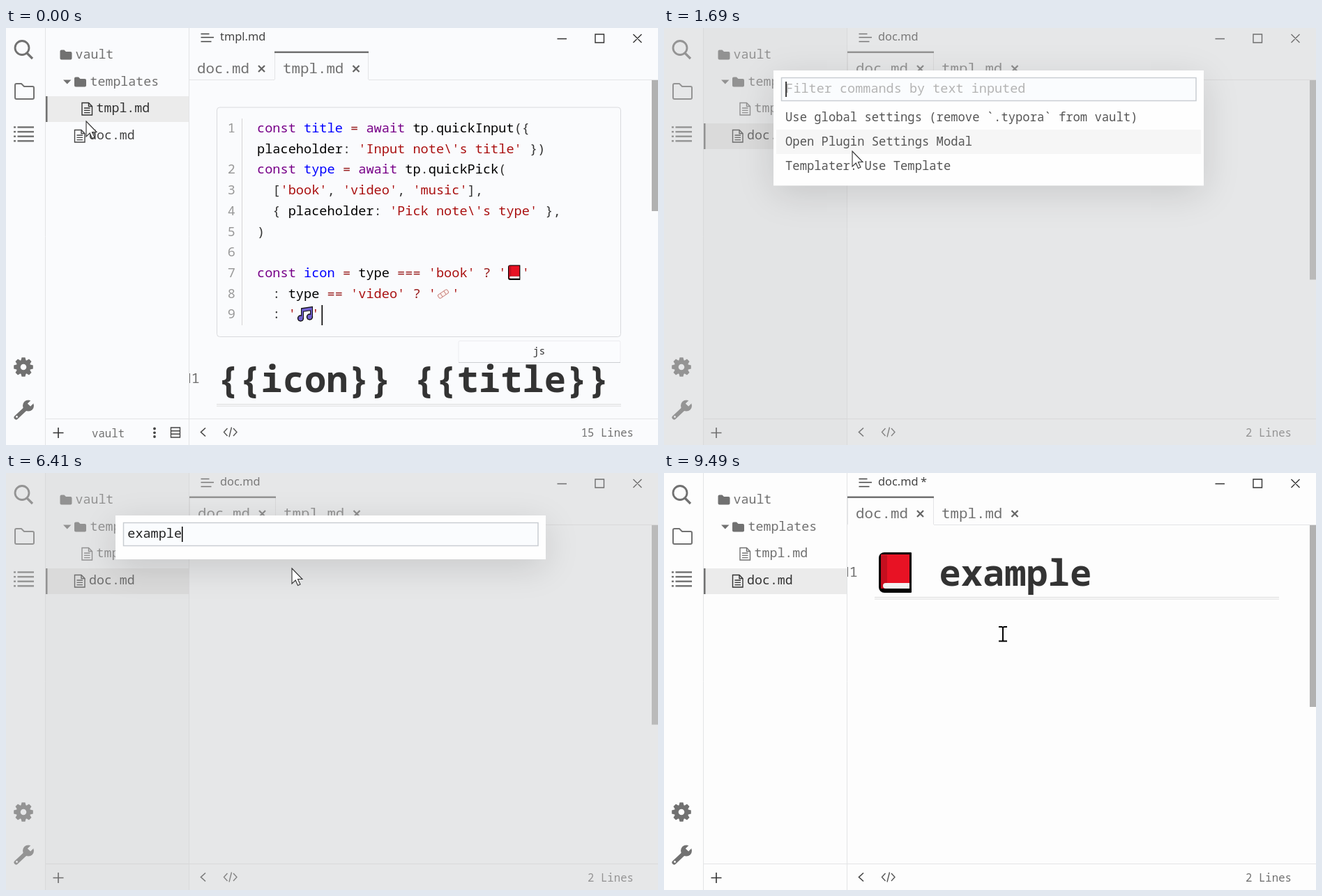
Animation of 935x599 px, one loop 9690 ms. Source, as an HTML page with a canvas:

```html
<!DOCTYPE html>
<html lang="en">
<head>
<meta charset="utf-8">
<title>Note templates</title>
<style>
  html, body { margin: 0; width: 100%; height: 100%; overflow: hidden; background: #fafbfd; }
  canvas { display: block; width: 100vw; height: 100vh; }
</style>
</head>
<body>
<canvas id="stage" width="935" height="599"></canvas>
<script>
const ctx = document.getElementById('stage').getContext('2d');
const LOOP = 9690, BLINK = 530;
const OPEN_DOC = 600, OPEN_MODAL = 1690, CLOSE_MODAL = 8030, MARK_EDITED = 8090, INSERT = 8350;
const MONO = '"Noto Sans Mono", "DejaVu Sans Mono", monospace';
const SANS = '"Noto Sans", "Open Sans", sans-serif';
const GREY = '#717171', DARK = '#333', RULE = '#e3e4e6';

const pointerPath = [
  [70, 115, 134], [530, 150, 150], [1000, 150, 150], [1400, 172, 188], [1620, 243, 184],
  [1690, 270, 177], [2000, 278, 177], [2200, 292, 192], [2430, 300, 192], [2760, 411, 140],
  [3680, 411, 140], [4020, 410, 137], [7240, 410, 137], [7290, 410, 122], [7430, 410, 122],
  [7760, 411, 122], [8350, 411, 122], [8960, 486, 231]
];

const prompts = [
  { at: 1690, hint: 'Filter commands by text inputed', rows: [
    'Use global settings (remove `.typora` from vault)',
    'Open Plugin Settings Modal', 'Templater: Use Template'] },
  { at: 2430, hint: 'Select a template', rows: ['tmpl.md'] },
  { at: 3890, hint: "Input note's title", rows: [] },
  { at: 6890, hint: "Pick note's type", rows: ['book', 'video', 'music'] }
];
const typed = 'example', keyTimes = [4620, 4950, 5580, 5680, 6020, 6210, 6410];

// Each entry: line number, code. Double spaces in quotes leave room for icons.
const code = [
  [1, 'const title = await tp.quickInput({'],
  ['', "placeholder: 'Input note\\'s title' })"],
  [2, 'const type = await tp.quickPick('],
  [3, "  ['book', 'video', 'music'],"],
  [4, "  { placeholder: 'Pick note\\'s type' },"],
  [5, ')'],
  [6, ''],
  [7, "const icon = type === 'book' ? '  '"],
  [8, "  : type == 'video' ? '  '"],
  [9, "  : '  '"]
];
const tokenRule = /('(?:\\.|[^'\\])*')|\b(const|await)\b|((?<=const )\w+)|([=?]+)|(\w+)|([^\w\s])/g;
const tokenColors = ['#a11', '#708', '#00f', '#981a1a', '#000', '#333'];

function text(str, x, y, size, color, { font = MONO, weight = 400, align = 'left' } = {}) {
  ctx.font = `${weight} ${size}px ${font}`;
  ctx.textAlign = align;
  ctx.fillStyle = color;
  ctx.fillText(str, x, y);
}

function rect(x, y, w, h, color) {
  ctx.fillStyle = color;
  ctx.fillRect(x, y, w, h);
}

function box(x, y, w, h, radius, fill, stroke, width = 1) {
  ctx.beginPath();
  ctx.roundRect(x, y, w, h, radius);
  if (fill) { ctx.fillStyle = fill; ctx.fill(); }
  if (stroke) { ctx.strokeStyle = stroke; ctx.lineWidth = width; ctx.stroke(); }
}

// Paths are SVG path strings.
function stroke(path, width = 1.5, color = GREY) {
  ctx.strokeStyle = color;
  ctx.lineWidth = width;
  ctx.stroke(new Path2D(path));
}

function fill(path, color = GREY) {
  ctx.fillStyle = color;
  ctx.fill(new Path2D(path));
}

function dot(x, y, r, color) {
  ctx.fillStyle = color;
  ctx.beginPath();
  ctx.arc(x, y, r, 0, 7);
  ctx.fill();
}

function at(x, y, scale, draw) {
  ctx.save();
  ctx.translate(x, y);
  ctx.scale(scale, scale);
  draw();
  ctx.restore();
}

const blinkOn = (t, since) => Math.floor((t - since) / BLINK) % 2 === 0;

function pointerAt(t) {
  const i = pointerPath.findIndex(p => p[0] > t);
  if (i === 0) return pointerPath[0].slice(1);
  if (i < 0) return pointerPath.at(-1).slice(1);
  const [t0, x0, y0] = pointerPath[i - 1], [t1, x1, y1] = pointerPath[i];
  const k = (t - t0) / (t1 - t0);
  return [x0 + (x1 - x0) * k, y0 + (y1 - y0) * k];
}

function book(x, y, scale) {
  at(x, y, scale, () => {
    box(0, 0, 47, 58, [8, 1, 1, 8], '#000');
    rect(3, 3, 41, 41, '#e81224');
    rect(3, 4, 9, 48, '#c50f1f');
    box(6, 44, 38, 8, [4, 0, 0, 4], '#f2f2f2');
  });
}

function musicNote(x, y) {
  at(x, y, 1, () => {
    stroke('M7 16V4L20 2V14M7 6L20 4', 4, '#111');
    dot(4.5, 17, 4.7, '#111');
    dot(17.5, 15, 4.7, '#111');
    stroke('M7 16V4.3L20 2.3V14M7 6L20 4', 1.8, '#7160d0');
    dot(4.5, 17, 3.2, '#7160d0');
    dot(17.5, 15, 3.2, '#7160d0');
  });
}

function clip(x, y) {
  at(x, y, 1, () => {
    ctx.rotate(-0.6);
    box(-8, -3, 16, 6, 2, '#fdf3f0', '#c98580', 1);
    stroke('M-3 -3V3M3 -3V3', 1, '#c98580');
  });
}

function folder(x, y) {
  fill(`M${x} ${y + 2}q0 -2 2 -2h4l2.5 2.5h6.5q2 0 2 2v7.500q0 2 -2 2h-13q-2 0 -2 -2z`);
}

function fileIcon(x, y, color) {
  stroke(`M${x} ${y}h9.500l5 5v12.500h-14.500zM${x + 9.5} ${y}v5h5`, 1.4, color);
  stroke(`M${x + 3} ${y + 7.5}h8.500m-8.500 3.300h8.500m-8.500 3.300h8.500`, 1.3, color);
}

function gear(x, y) {
  at(x, y, 1, () => {
    for (let i = 0; i < 8; i++) {
      ctx.rotate(Math.PI / 4);
      fill('M-3.700 -9L-2.500 -13.800H2.500L3.700 -9z');
    }
    ctx.beginPath();
    ctx.arc(0, 0, 7.3, 0, 7);
    ctx.strokeStyle = GREY;
    ctx.lineWidth = 6;
    ctx.stroke();
  });
}

function ribbon(bg) {
  ctx.beginPath();
  ctx.arc(23, 28.5, 10, 0, 7);
  ctx.strokeStyle = GREY;
  ctx.lineWidth = 2.8;
  ctx.stroke();
  stroke('M30 36L38 44', 3.2);
  stroke('M13 82q0 -2 2 -2h7l4 4h12q2 0 2 2v14q0 2 -2 2h-23q-2 0 -2 -2z', 2);
  for (let y = 142.5; y < 164; y += 6.6) {
    rect(11, y - 1.2, 3, 2.4, GREY);
    rect(16.5, y - 1.2, 23.5, 2.4, GREY);
  }
  gear(25, 487);
  ctx.lineCap = 'round';
  stroke('M14.500 559.500L31 544', 6);
  ctx.lineCap = 'butt';
  dot(32, 542.5, 8, GREY);
  stroke('M33 541.500L42 532.500', 6, bg);
  dot(15.5, 558.5, 1.4, bg);
}

function sidebar(docOpen, hovered) {
  const rowY = docOpen ? 137 : 98;
  rect(57, rowY, 205, 37, '#ebebeb');
  rect(57, rowY, 2.5, 37, GREY);
  folder(77.5, 31.5);
  text('vault', 99.5, 44, 18.3, GREY);
  fill('M82 74.500h11.500l-5.750 6z');
  folder(98, 70.5);
  text('templates', 120.5, 82.5, 18.3, GREY);
  const tmplColor = docOpen ? GREY : DARK, docColor = docOpen ? DARK : GREY;
  fileIcon(109, 107.5, tmplColor);
  text('tmpl.md', 129.5, 121, 18.3, tmplColor);
  fileIcon(98.5, 146.5, docOpen ? DARK : '#444');
  text('doc.md', 119, 160, 18.3, docOpen ? docColor : '#444');
  stroke('M67.500 581.500h15M75 574v15', 1.6, DARK);
  if (hovered) {
    text('vault', 123, 587.5, 15.7, GREY);
    for (const y of [575.5, 581.3, 587]) dot(213, y, 1.9, '#444');
    stroke('M236.500 574h13v14h-13zM236.500 578.700h13M236.500 583.300h13', 1.4, '#444');
  }
}

function tab(name, x, active, left, right) {
  if (active) {
    stroke(`M${left + .5} 74V35M${right - .5} 35V74`, 1, RULE);
    rect(left, 33.5, right - left, 2.5, GREY);
  }
  text(name, x, 65, 20.8, GREY);
  const cx = x + name.length * 12.5 + 17.5;
  stroke(`M${cx - 4.5} 54l9 9m0 -9l-9 9`, 2.3, '#666');
}

function windowFrame(docOpen, edited, lineCount) {
  stroke('M56.500 0V599M262.500 0V599M57 561.500H935', 1, RULE);
  stroke('M279.500 8.500h12M279.500 13.500h18.500M279.500 19.500h15', 1.3, '#444');
  text(docOpen ? 'doc.md' : 'tmpl.md', 307, 18, 16.4, '#444', { font: SANS });
  if (edited) text('*', 368, 18, 16.4, '#444', { font: SANS });
  stroke('M790.500 15.500h13.500M845 9h12.500v12h-12.500zM899.500 9l12 12m0 -12l-12 12', 1.4, DARK);
  const shift = docOpen ? 1 : 0;
  stroke(docOpen ? 'M387 74.500H935' : 'M263 74.500H385M520 74.500H935', 1, RULE);
  tab('doc.md', 274 + shift, docOpen, 263, 387);
  tab('tmpl.md', 397 + shift, !docOpen, 385, 520);
  stroke('M286 574.500l-6.500 6l6.500 6', 1.6, '#444');
  stroke('M317.500 575l-5 5.500l5 5.500M326 575l5 5.500l-5 5.500M323.500 573.500l-3.500 14', 1.4, '#555');
  text(`${lineCount} Lines`, 900, 586.5, 15.7, GREY, { align: 'right' });
}

function headingTag(baseline) {
  ctx.save();
  ctx.beginPath();
  ctx.rect(263, 0, 40, 599);
  ctx.clip();
  text('H1', 278, baseline, 20.8, GREY, { align: 'right' });
  ctx.restore();
}

function templatePage(t) {
  const size = 18.62, step = size * 0.6;
  box(302.5, 114, 579, 329.5, 4, null, '#d9dadd');
  stroke('M338.500 130V427', 1, '#d5d5d5');
  code.forEach(([number, line], i) => {
    const y = 150 + i * 29.7;
    text(number, 329, y, size, '#999', { align: 'right' });
    for (const match of line.matchAll(tokenRule)) {
      const kind = match.slice(1).findIndex(Boolean);
      text(match[0], 360 + match.index * step, y, size, tokenColors[kind]);
    }
  });
  book(720, 340.5, 0.37);
  clip(627, 382);
  musicNote(418, 400);
  if (blinkOn(t, 0)) rect(452.5, 398, 1.6, 29, '#000');
  headingTag(510);
  text('{{icon}} {{title}}', 303, 523, 52.1, DARK, { weight: 700 });
  stroke('M302 540.500H882M302 543H882', 1, '#dcdcdc');
  box(649, 449.5, 232, 31, 2, '#fbfcfe', '#ececf0');
  rect(649, 480, 232, 1, '#ccced2');
  text('js', 764.5, 469, 14.6, DARK, { align: 'center' });
}

function notePage(t) {
  headingTag(149);
  book(308, 114, 1);
  text('example', 394.5, 161.5, 52.1, DARK, { weight: 700 });
  stroke('M302 178.500H882M302 181H882', 1, '#dcdcdc');
  if (blinkOn(t, 7900)) rect(302, 202, 1.3, 26, '#000');
}

function modal(t, pointerY) {
  rect(0, 0, 935, 599, 'rgba(200,200,200,.4)');
  rect(57, 0, 205, 599, 'rgba(0,0,0,.012)');
  const prompt = prompts.findLast(p => p.at <= t);
  const { rows, hint } = prompt;
  const input = rows.length ? '' : typed.slice(0, keyTimes.filter(k => k <= t).length);
  ctx.save();
  ctx.shadowColor = 'rgba(0,0,0,.13)';
  ctx.shadowBlur = 50;
  ctx.shadowOffsetY = 12;
  rect(157, 61, 617, Math.max(63, 61 + rows.length * 34.8), '#fefefe');
  ctx.restore();
  box(168.5, 71.5, 594.5, 33, 0, '#fafcfe', '#c9cdd2', 1.5);
  text(input || hint, 174.3, 93, 18.5, input ? '#222' : '#b4b4b4');
  const hovered = Math.max(0, Math.min(rows.length - 1, Math.floor((pointerY - 111) / 35)));
  rows.forEach((row, i) => {
    if (i === hovered) rect(161, 111 + i * 35, 609, 35, '#f6f6f6');
    text(row, 174, 133.5 + i * 35, 17.2, '#555');
  });
  const lastInput = Math.max(prompt.at, ...keyTimes.filter(k => k <= t));
  if (t < 7900 && blinkOn(t, lastInput)) rect(174.3 + input.length * 11.1, 77, 1.5, 22, '#000');
}

function pointer(x, y, beam) {
  at(x, y, 1, () => {
    if (beam) return stroke('M-6 -10H-1.500L0 -9L1.500 -10H6M0 -9V10M-6 10.500H6', 2, '#000');
    const arrow = 'M0 0L15 15.500H8.500L12 23L8.500 24.500L5.200 17L0 22z';
    fill(arrow, '#fff');
    stroke(arrow, 1.1, '#333');
  });
}

function draw(t) {
  const docOpen = t >= OPEN_DOC, inserted = t >= INSERT;
  const modalOpen = t >= OPEN_MODAL && t < CLOSE_MODAL;
  const bg = t < CLOSE_MODAL ? '#fafbfd' : '#fdfdfd';
  const [x, y] = pointerAt(t);
  rect(0, 0, 935, 599, bg);
  ribbon(bg);
  sidebar(docOpen, x < 263 && !modalOpen);
  windowFrame(docOpen, t >= MARK_EDITED, docOpen ? 2 : 15);
  rect(926, 75, 9, !docOpen ? 188 : inserted ? 261 : 286.5, '#b1b1b1');
  if (!docOpen) templatePage(t);
  if (inserted) notePage(t);
  if (modalOpen) modal(t, y);
  pointer(x, y, t >= CLOSE_MODAL);
}

function frame() {
  draw(performance.now() % LOOP);
  requestAnimationFrame(frame);
}
frame();
</script>
</body>
</html>
```
